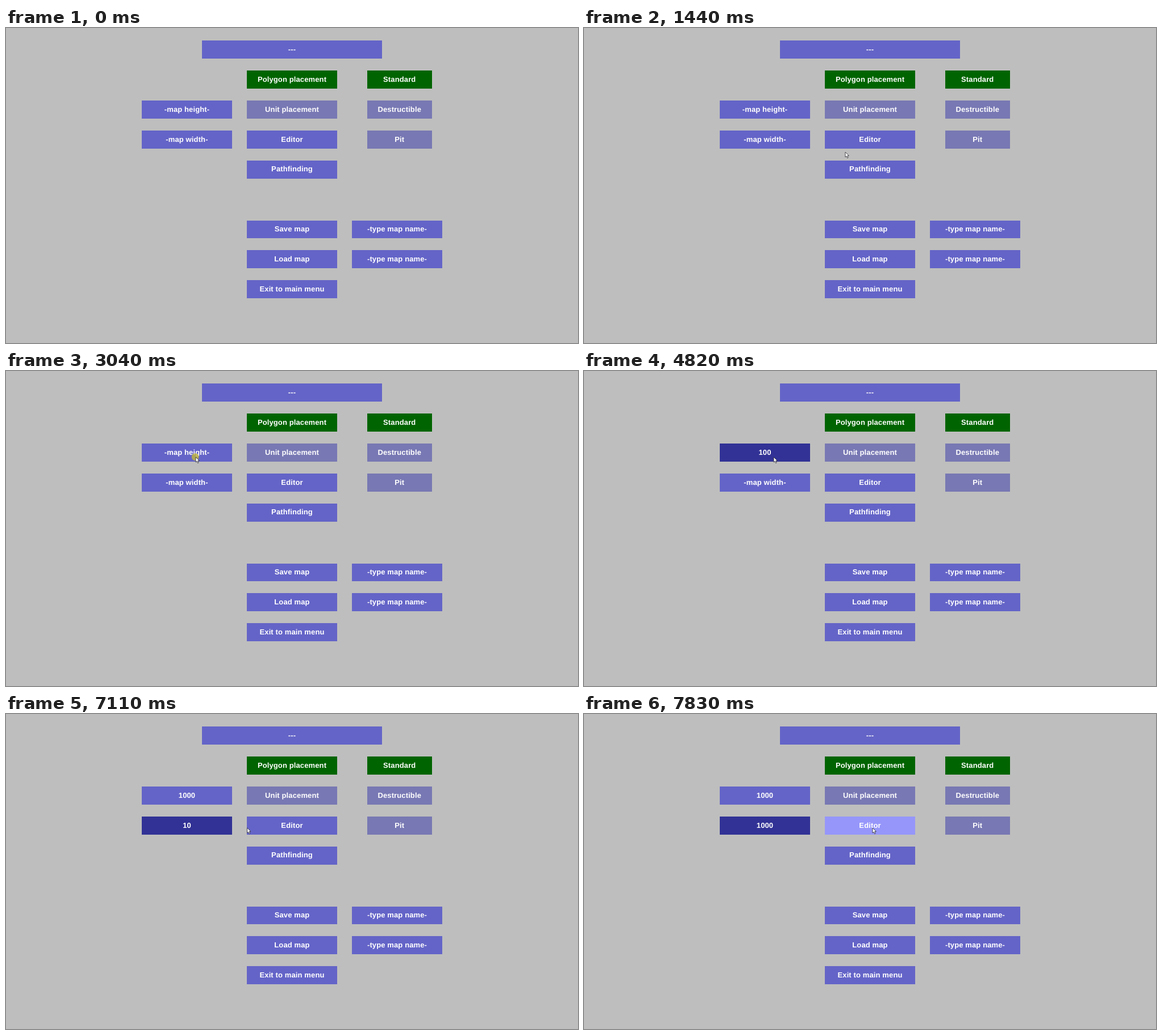
Write an HTML page that moves like this. It is 1007 by 556 pixels and loops after 8000 ms.

```html
<!DOCTYPE html>
<html lang="en">
<head>
<meta charset="utf-8">
<title>Map editor menu</title>
<style>
  html, body { margin: 0; width: 100%; height: 100%; overflow: hidden; background: #bebebe; }
  svg { display: block; width: 1007px; height: 556px; }
  text {
    font: bold 13px "Liberation Sans", Arial, sans-serif;
    letter-spacing: .12px;
    text-anchor: middle;
    text-rendering: geometricPrecision;
    fill: #fff;
  }
</style>
</head>
<body>
<svg id="stage" viewBox="0 0 1007 556">
  <g id="buttons"></g>
  <circle id="click" cx="-.8" cy="-.4" r="6.4" fill="#c8be32" opacity=".75"/>
  <path id="cursor" d="M0 0V9L2 7.2L3.6 10.6L5.1 9.9L3.6 6.6L6.4 6.4Z"
        fill="#fff" stroke="#26262e" stroke-width=".8"/>
</svg>
<script>
const LOOP = 8000, TICK = 65.8, LEAD = 11;
const UNIT = .5286; // menu layout units to pixels
const COLORS = { normal: '#6464c8', on: '#006400', off: '#7878b4', focus: '#323296', hover: '#9696fa' };
const $ = id => document.getElementById(id);

function add(tag, attrs) {
  const el = document.createElementNS('http://www.w3.org/2000/svg', tag);
  for (const name in attrs) el.setAttribute(name, attrs[name]);
  return $('buttons').appendChild(el);
}

// offset from the centre line and width are in layout units
function button(label, offset, row, state = 'normal', units = 300) {
  const cx = 503.5 + offset * UNIT, top = 22.4 + 100 * UNIT * row;
  const half = units * UNIT / 2;
  const x = Math.round(cx - half), right = Math.round(cx + half);
  const y = Math.round(top), bottom = Math.round(top + 60 * UNIT);
  const rect = add('rect', { x, y, width: right - x, height: bottom - y });
  const text = add('text', { x: cx });
  return {
    label,
    set(value, mode) {
      // labels with descenders sit slightly higher
      const lift = /[gpy]/.test(value) ? .4 : 0;
      text.textContent = value;
      text.setAttribute('y', top + 30 * UNIT + 4.1 - lift);
      rect.setAttribute('fill', COLORS[mode]);
      return this;
    },
    contains: p => p.x > x && p.x < right && p.y > y && p.y < bottom
  }.set(label, state);
}

button('---', 0, 0, 'normal', 600);
button('Polygon placement', 0, 1, 'on');
button('Unit placement', 0, 2, 'off');
const editor = button('Editor', 0, 3);
button('Pathfinding', 0, 4);
['Save map', 'Load map', 'Exit to main menu'].forEach((name, i) => button(name, 0, 6 + i));
['Standard', 'Destructible', 'Pit'].forEach((name, i) => button(name, 358, 1 + i, i ? 'off' : 'on', 215));
[6, 7].forEach(row => button('-type map name-', 350, row));

const fields = [
  { box: button('-map height-', -350, 2), focus: 3100, blur: 5530, keys: [3630, 3890, 4020, 4890] },
  { box: button('-map width-', -350, 3), focus: 5530, blur: LOOP, keys: [6590, 6850, 7170, 7300] }
];

// turning points of the cursor tip
const path = [
  { t: 2, x: 968, y: 546 }, { t: 6, x: 816, y: 376 }, { t: 8, x: 816, y: 376 },
  { t: 16, x: 575, y: 133 }, { t: 19, x: 503, y: 198.5 }, { t: 22, x: 460, y: 219 },
  { t: 28, x: 343, y: 160.5 }, { t: 31, x: 321.5, y: 139.5 }, { t: 35, x: 334, y: 152 },
  { t: 74, x: 334, y: 152 }, { t: 80, x: 327, y: 201 }, { t: 104, x: 327, y: 201 },
  { t: 108, x: 424.6, y: 201 }, { t: 115, x: 508, y: 218 }, { t: 119, x: 508, y: 201 }
];

function slope(i, axis) {
  const a = path[i], b = path[i + 1];
  return a && b ? (b[axis] - a[axis]) / (b.t - a.t) : 0;
}

// harmonic mean keeps the curve from overshooting its turning points
function tangent(i, axis) {
  const p = slope(i - 1, axis), q = slope(i, axis);
  return p * q > 0 ? 2 * p * q / (p + q) : 0;
}

function cursorAt(tick) {
  const t = Math.min(Math.max(tick, path[0].t), path[path.length - 1].t);
  const i = Math.max(path.findIndex(p => p.t >= t) - 1, 0);
  const a = path[i], b = path[i + 1], span = b.t - a.t;
  const k = (t - a.t) / span, ease = k * k * (3 - 2 * k);
  const along = axis => a[axis] + (b[axis] - a[axis]) * ease +
    span * k * (1 - k) * ((1 - k) * tangent(i, axis) - k * tangent(i + 1, axis));
  return { x: along('x'), y: along('y') };
}

function place(el, p, visible) {
  el.setAttribute('transform', `translate(${p.x} ${p.y})`);
  el.setAttribute('visibility', visible ? 'visible' : 'hidden');
}

function draw(t) {
  const tick = Math.floor((t + LEAD) / TICK);
  const tip = cursorAt(tick);
  place($('cursor'), tip, tick >= path[0].t);
  place($('click'), tip, fields.some(f => t >= f.focus - TICK && t < f.focus));
  for (const { box, focus, blur, keys } of fields) {
    const typed = '1000'.slice(0, keys.filter(k => k <= t).length);
    box.set(t < focus ? box.label : typed, t >= focus && t < blur ? 'focus' : 'normal');
  }
  // hover reacts one tick late
  editor.set(editor.label, editor.contains(cursorAt(tick - 1)) ? 'hover' : 'normal');
}

const start = performance.now();
function loop() {
  draw((performance.now() - start) % LOOP);
  requestAnimationFrame(loop);
}
loop();
</script>
</body>
</html>
```
